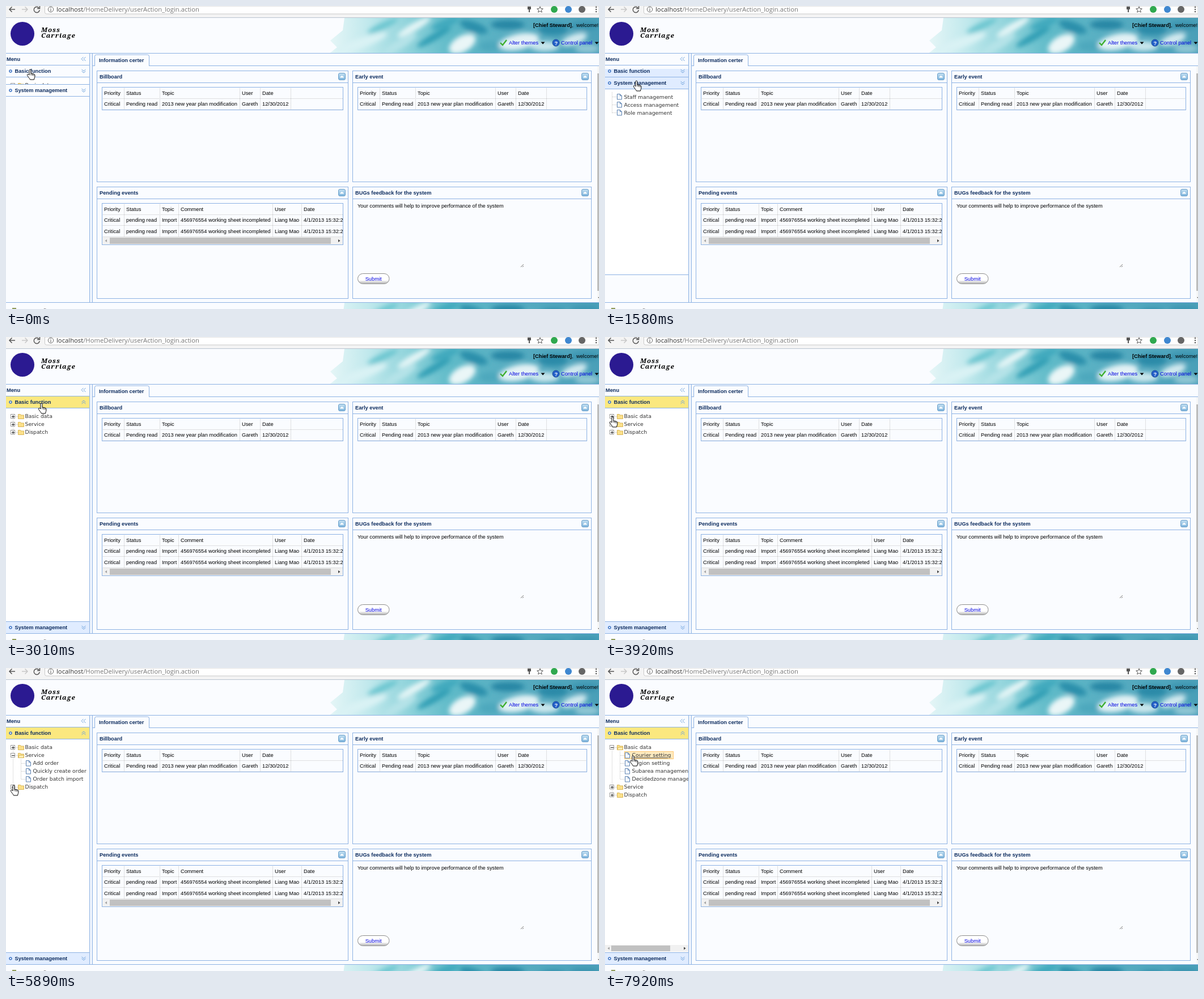
These frames come from a looping animation (1046 px wide and 535 px high, 8000 ms). An HTML page:

```html
<!DOCTYPE html>
<html lang="en">
<head>
<meta charset="utf-8">
<title>Admin menu</title>
<style>
html, body { margin: 0; width: 100%; height: 100%; overflow: hidden; background: #fafcff; }
#stage { display: block; }
text { font: 9.27px "Liberation Sans", Arial, sans-serif; fill: #000; white-space: pre; }
.b { font-weight: bold; fill: #0e2d5f; }
.blue { fill: #0000e0; }
.url { font: 11.28px "Open Sans", "Noto Sans", sans-serif; fill: #777; }
.brand { font: italic bold 11.5px "Noto Serif", serif; letter-spacing: 1px; }
.tree { font-family: "DejaVu Sans", Verdana, sans-serif; fill: #333; }
.u { text-decoration: underline; }
rect, line { shape-rendering: crispEdges; }
.soft { shape-rendering: auto; }
</style>
</head>
<body>
<svg id="stage" width="1046" height="535" viewBox="0 0 1046 535"></svg>
<script>
const EDGE = '#8db2e3', PLAIN = '#fafcff', BLUE = '#e0ecff', YELLOW = '#fbe87f';
const text = (x, y, s, cls = '') => `<text x="${x}" y="${y}" class="${cls}">${s}</text>`;
const rect = (x, y, w, h, fill, stroke = 'none', more = '') =>
  `<rect x="${x}" y="${y}" width="${w}" height="${h}" fill="${fill}" stroke="${stroke}" ${more}/>`;
const line = (x1, y1, x2, y2, color = EDGE, more = '') =>
  `<line x1="${x1}" y1="${y1}" x2="${x2}" y2="${y2}" stroke="${color}" ${more}/>`;
const path = (d, fill = 'none', stroke = 'none', more = '') =>
  `<path d="${d}" fill="${fill}" stroke="${stroke}" ${more}/>`;
const disc = (x, y, r, fill, stroke = 'none', more = '') =>
  `<circle cx="${x}" cy="${y}" r="${r}" fill="${fill}" stroke="${stroke}" ${more}/>`;
const clip = (x, y, w, h, body) => `<svg x="${x}" y="${y}" width="${w}" height="${h}">${body}</svg>`;
const dots = (x1, y1, x2, y2) => line(x1, y1, x2, y2, '#c4c4c4', 'stroke-dasharray="1 1"');

// Soft cloudy sky: a gradient with tilted streaks (x, y, radii, tilt, colour).
function skyDefs() {
  const stops = [[0, '#e6f6f7'], [.15, '#bfe8ec'], [.3, '#8dd2da'], [.45, '#5fbac8'], [.65, '#58aec2'], [1, '#4a9fb8']];
  const clouds = [
    [55, 45, 50, 9, -20, '#d9f2f4'], [95, 14, 30, 6, -25, '#6cc6d0'], [125, 46, 34, 8, -30, '#b5e3e8'],
    [150, 16, 34, 7, -30, '#e4f5f6'], [185, 34, 34, 6, -30, '#2f9db4'], [205, 10, 26, 7, -20, '#3fa9bd'],
    [235, 46, 26, 14, -30, '#eaf6f7'], [255, 16, 26, 9, 20, '#2a8fab'], [285, 50, 20, 9, 0, '#4ea8bd'],
    [315, 12, 30, 8, 0, '#2686a4'], [335, 42, 36, 14, -12, '#e3f2f5'], [380, 50, 26, 9, 0, '#c9e6ec'],
    [395, 20, 26, 10, 0, '#2b8aa8'], [432, 38, 24, 9, -20, '#d2e9ef'], [455, 54, 22, 8, 0, '#8fc6d4'],
    [450, 14, 26, 8, 0, '#3a94b0']
  ];
  return `<defs><linearGradient id="air">${stops.map(([o, c]) => `<stop offset="${o}" stop-color="${c}"/>`).join('')}</linearGradient>
    <linearGradient id="btn" x2="0" y2="1"><stop offset=".65" stop-color="#fff"/><stop offset=".9" stop-color="#c4c4c4"/></linearGradient>
    <linearGradient id="tool" x2="0" y2="1"><stop stop-color="#c4e0f2"/><stop offset="1" stop-color="#7db4dc"/></linearGradient>
    <filter id="blur" x="-10%" width="120%" y="-30%" height="160%"><feGaussianBlur stdDeviation="4"/></filter>
    <clipPath id="coast"><path d="M27 0H476V63H0L14 52L2 40L24 22Z"/></clipPath>
    <g id="sky" clip-path="url(#coast)">${rect(0, 0, 476, 63, 'url(#air)')}<g filter="url(#blur)">${
      clouds.map(([x, y, rx, ry, turn, c]) =>
        `<ellipse rx="${rx}" ry="${ry}" fill="${c}" transform="translate(${x} ${y}) rotate(${turn})"/>`).join('')}</g></g></defs>`;
}

const caret = (x, y) => path(`M${x - 3.5} ${y - 2}h7l-3.5 4z`, '#000');

function browserBar() {
  return rect(0, 0, 1046, 20, '#f4f4f4') + path('M68.5 0V11q0 3 3 3H1046V0z', '#fff', '#c9c9c9') +
    line(0, 20.5, 1046, 20.5, '#b9c3cf') +
    path('M16 6H6M10.5 1.5L6 6l4.5 4.5', 'none', '#555', 'stroke-width="1.5"') +
    path('M28 6h10M33.5 1.5L38 6l-4.5 4.5', 'none', '#c8c8c8', 'stroke-width="1.5"') +
    path('M58.2 3.5a5 5 0 1 0 1 3.5M59.5 0v4.5H55', 'none', '#555', 'stroke-width="1.5"') +
    disc(79, 6, 4.7, 'none', '#666') + path('M79 5.5V9M79 3v1.3', 'none', '#666', 'stroke-width="1.2"') +
    '<text x="89" y="10" class="url"><tspan fill="#333">localhost</tspan>/HomeDelivery/userAction_login.action</text>' +
    path('M920 1h6v5h-2v5h-2V6h-2z', '#555') +
    path('M942 1l1.5 3.6 3.8.3-2.9 2.4.9 3.8-3.3-2-3.3 2 .9-3.8-2.9-2.4 3.8-.3z', 'none', '#555') +
    disc(967, 6, 6, '#2fa84f') + disc(992, 6, 6, '#3f87d0') + disc(1016, 6, 6, '#666') +
    [2, 6, 10].map(y => disc(1041, y, 1.2, '#555')).join('');
}

function pageHeader() {
  return clip(570, 21, 476, 62, '<use href="#sky"/>') +
    disc(29, 49, 21, '#2b1a91') + text(62, 46, 'Moss', 'brand') + text(62, 55.5, 'Carriage', 'brand') +
    '<text x="930" y="36.5"><tspan font-weight="bold">[Chief Steward]</tspan>,</text>' + text(1006, 36.5, 'welcome!') +
    path('M872 65l4 4 7-9', 'none', '#3cae2e', 'stroke-width="2.4"') + text(887, 68, 'Alter themes', 'blue') + caret(947, 65.5) +
    disc(970, 65, 6, '#2360c8', '#1a489b') + '<text x="967.4" y="68.5" style="fill:#fff;font-weight:bold">?</text>' +
    text(979, 68, 'Control panel', 'blue') + caret(1042, 65.5) + line(0, 83.5, 1046, 83.5);
}

function panel(x, y, w, h, title) {
  const bx = x + w - 17, by = y + 4;
  return rect(x + .5, y + .5, w, h, 'none', EDGE) + line(x, y + 21.5, x + w, y + 21.5) +
    text(x + 5, y + 14, title, 'b') +
    rect(bx + .5, by + .5, 12, 12, 'url(#tool)', '#6a9fca', 'rx="2.5" class="soft"') +
    path(`M${bx + 3.5} ${by + 8}l3-3 3 3z`, '#fff', '#fff');
}

// Column positions are relative to the left edge of the grid.
function grid(x, y, w, h, cols, rows) {
  let body = '';
  rows.forEach((cells, r) => {
    body += dots(0, r * 19.5 + 20, w, r * 19.5 + 20);
    cells.forEach((s, c) => body += text(cols[c] + 4, r * 19.5 + 13.5, s));
  });
  cols.slice(1).forEach(c => body += dots(c + .5, 0, c + .5, rows.length * 19.5));
  return clip(x, y, w, h, body) + rect(x + .5, y + .5, w, h, 'none', EDGE);
}

function hScroll(x, y, w, h, from, to) {
  const m = y + h / 2;
  return rect(x, y, w, h, '#f1f1f1') + rect(from, y + 1, to - from, h - 2, '#c1c1c1') +
    path(`M${x + 8} ${m - 2.5}v5l-3.5-2.5z`, '#a3a3a3') + path(`M${x + w - 8} ${m - 2.5}v5l3.5-2.5z`, '#444');
}

function content() {
  const board = [['Priority', 'Status', 'Topic', 'User', 'Date'],
    ['Critical', 'Pending read', '2013 new year plan modification', 'Gareth', '12/30/2012']];
  const cols = [0, 39, 102, 243, 279, 333];
  const event = ['Critical', 'pending read', 'Import', '456976554 working sheet incompleted', 'Liang Mao', '4/1/2013 15:32:25'];
  return rect(148, 84, 4, 439, '#eef4fd') + line(152.5, 83, 152.5, 523) + line(152, 105.5, 1046, 105.5) +
    path('M156.5 106V89q0-3 3-3H249.5q3 0 3 3V106', PLAIN, EDGE) + text(164, 98.5, 'Information certer', 'b') +
    panel(160, 114, 443, 196, 'Billboard') + panel(611, 114, 421, 196, 'Early event') +
    panel(160, 319, 443, 197, 'Pending events') + panel(611, 319, 421, 197, 'BUGs feedback for the system') +
    grid(169, 143, 425, 39.5, cols, board) + grid(620, 143, 404, 39.5, cols, board) +
    grid(169, 348, 425, 73, [0, 39, 102, 135, 301, 352],
      [['Priority', 'Status', 'Topic', 'Comment', 'User', 'Date'], event, event]) +
    hScroll(170, 408, 424, 13, 183, 573) +
    text(620, 356, 'Your comments will help to improve performance of the system') +
    path('M908 461l5-5M911 461l2-2', 'none', '#777') +
    rect(620.5, 472.5, 55.5, 18, 'url(#btn)', '#8d8d8d', 'rx="9" class="soft"') + text(633.7, 484.5, 'Submit', 'blue') +
    rect(1043, 106, 3, 417, '#f6f6f6') + rect(1043, 119, 3, 384, '#bcbcbc') + path('M1044 514h2v2z', '#555');
}

function footer() {
  return line(0, 523.5, 1046, 523.5) + clip(570, 524, 476, 11, '<use href="#sky"/>') +
    rect(11, 533, 7, 2, '#8f9a5a') + text(23, 541, 'Current online users');
}

function chevrons(y, up) {
  const v = up ? -3 : 3, a = y - v;
  return path(`M133.5 ${a}l3.5 ${v}l3.5 ${-v}M133.5 ${a + v}l3.5 ${v}l3.5 ${-v}`, 'none', '#6fa3dc');
}

function bar(y, title, fill, up) {
  return rect(0, y, 147, 21, fill) + line(0, y + .5, 147, y + .5) + line(0, y + 21.5, 147, y + 21.5) +
    disc(8, y + 11, 2, '#fff', '#3b73c4', 'stroke-width="1.5"') + text(15.5, y + 14, title, 'b') + chevrons(y + 11, up);
}

const sheet = (x, y) => path(`M${x + .5} ${y - 4.5}h5l3 3v6.5h-8z`, '#f4f9ff', '#5d82b0') +
  path(`M${x + 5.5} ${y - 4.5}v3h3`, 'none', '#5d82b0');

function folder(y, open) {
  return path(`M21.5 ${y + 4.5}v-8h4l1 1.5h5v6.5z`, '#fbe08a', '#d9b65a') +
    (open ? path(`M21.5 ${y + 4.5}l2-4.5h8.5l-1.5 4.5z`, '#fff0b5', '#d9b65a') : '');
}

const toggle = (y, open) => rect(8.5, y - 3.5, 7, 7, '#fff', '#9a9a9a') + line(10, y + .5, 15, y + .5, '#222') +
  (open ? '' : line(12.5, y - 2, 12.5, y + 3, '#222'));

// Progress of a slide that starts at a given time, with cosine easing.
const slide = (t, start, length) => .5 - Math.cos(Math.PI * Math.min(1, Math.max(0, (t - start) / length))) / 2;

const folders = [
  { name: 'Basic data', open: t => slide(t, 4070, 200) - slide(t, 4560, 200) + slide(t, 7517, 200),
    kids: ['Courier setting', 'Region setting', 'Subarea management', 'Decidedzone management'] },
  { name: 'Service', open: t => slide(t, 5090, 200) - slide(t, 7040, 200),
    kids: ['Add order', 'Quickly create order', 'Order batch import'] },
  { name: 'Dispatch', open: t => slide(t, 5970, 200) - slide(t, 6500, 200),
    kids: ['Work order query', 'Manual dispatch'] }
];

function basicTree(t) {
  let y = 140, out = '';
  folders.forEach(({ name, open, kids }, i) => {
    const part = open(t), height = kids.length * 14 * part;
    const hover = i === 0 && t >= 3530 && t < 3800;
    if (i < 2) out += dots(12.5, y + 5, 12.5, y + 10 + height);
    out += dots(16, y + .5, 21, y + .5) + toggle(y, part > 0) + folder(y, part > 0) +
      text(33.5, y + 3.3, name, hover ? 'tree u' : 'tree');
    if (part > 0) {
      let body = dots(26.5, 0, 26.5, kids.length * 14 - 7);
      kids.forEach((kid, k) => {
        const ky = k * 14 + 7, chosen = t >= 7920 && i === 0 && k === 0;
        if (chosen) body += rect(34.5, ky - 6.5, 86, 13, '#ffebc0', '#ffc771');
        body += dots(27, ky + .5, 34, ky + .5) + sheet(35, ky) + text(47.5, ky + 3.3, kid, chosen ? 'tree u' : 'tree');
      });
      out += clip(0, y + 7, part < .999 ? 140 : 147, height, body);
    }
    y += 14 + height;
  });
  return out + (folders[0].open(t) > .999 ? hScroll(0, 489, 147, 12, 11, 115) : '');
}

function systemTree() {
  return dots(12.5, 152, 12.5, 189) + ['Staff management', 'Access management', 'Role management'].map((s, i) => {
    const y = 160 + i * 14;
    return dots(13, y + .5, 20, y + .5) + sheet(21, y) + text(33.5, y + 3.8, s, 'tree');
  }).join('');
}

// Pointer keys: time, x, y of the fingertip.
const pointerKeys = [
  [0, 43, 112], [380, 43, 112], [860, 56, 132], [1580, 56, 132], [1980, 64, 114], [2900, 64, 114],
  [3130, 61, 120], [3420, 61, 120], [3650, 22, 143], [3920, 14, 141], [4580, 14, 141], [4860, 15, 152],
  [5400, 15, 152], [5890, 14, 207], [6560, 14, 207], [6690, 14, 172], [6950, 14, 153], [7220, 14, 152],
  [7350, 14, 143], [7500, 14, 141], [7650, 14, 141], [7920, 50, 155]
];

function pointer(t) {
  const next = pointerKeys.findIndex(k => k[0] >= t);
  const b = pointerKeys[next], a = pointerKeys[Math.max(0, next - 1)];
  const f = b === a ? 0 : (t - a[0]) / (b[0] - a[0]);
  const at = i => Math.round(a[i] + (b[i] - a[i]) * f);
  return `<g transform="translate(${at(1)} ${at(2)})">` +
    path('M-2 9V1.5a1.5 1.5 0 0 1 3 0V7l5 1q2 .5 2 3c0 3-1 4-1.5 7h-7c-1-2.5-3-4-5-7.5q-.5-2 1-2t2.5 1.5z', '#fff', '#000') +
    path('M3.5 8v3M5.8 8.5v3M1 7v3.5', 'none', '#000', 'stroke-width=".8"') + '</g>';
}

// The sliding body of one accordion section.
const section = (y, height, body) =>
  clip(0, y, 147, height, rect(0, 0, 147, height, '#fff') + `<g transform="translate(0 ${-y})">${body}</g>`);

function menu(t) {
  const SPAN = 377;
  const basic = SPAN * (1 - slide(t, -352, 400) + slide(t, 2140, 400));
  const system = SPAN * (slide(t, 867, 400) - slide(t, 1487, 400));
  const basicOn = t > 2140, systemOn = t >= 860 && t < 1487;
  const settled = t >= 250, bottom = Math.floor(146 + system) + .5;
  return rect(0, 84, 147, 439, PLAIN) + text(1, 97, 'Menu', 'b') +
    path('M136.5 90l-3.5 3.5 3.5 3.5M140.5 90l-3.5 3.5 3.5 3.5', 'none', '#6fa3dc') +
    section(125, basic, basicTree(t)) +
    bar(104, 'Basic function', basicOn ? YELLOW : settled ? BLUE : PLAIN, basicOn) +
    (settled && !basicOn ? rect(0, 105, 147, 6, PLAIN) : '') +
    section(146, system, systemTree()) +
    (system > 0 ? line(0, bottom, 147, bottom) : '') +
    bar(Math.round(125 + basic), 'System management', systemOn ? YELLOW : settled ? BLUE : PLAIN, systemOn) +
    line(147.5, 83, 147.5, 523) + pointer(t);
}

// The screen refreshes only at these moments.
const moments = [0, 130, 250, 500, 620, 740, 860, 1010, 1130, 1280, 1580, 1730, 1850, 1980, 2120, 2270, 2390,
  2520, 2640, 3010, 3130, 3530, 3650, 3800, 3920, 4180, 4330, 4580, 4730, 4860, 4980, 5130, 5280, 5400, 5520,
  5650, 5770, 5890, 6040, 6160, 6560, 6690, 6830, 6950, 7080, 7220, 7350, 7500, 7650, 7790, 7920];

const stage = document.getElementById('stage');
stage.innerHTML = skyDefs() + rect(0, 0, 1046, 535, PLAIN) + browserBar() + pageHeader() + content() + footer() + '<g id="menu"></g>';
const menuLayer = document.getElementById('menu');
let shown = -1;

function tick() {
  const now = performance.now() % 8000;
  const t = moments.findLast(m => m <= now);
  if (t !== shown) menuLayer.innerHTML = menu(shown = t);
  requestAnimationFrame(tick);
}
tick();
</script>
</body>
</html>
```
